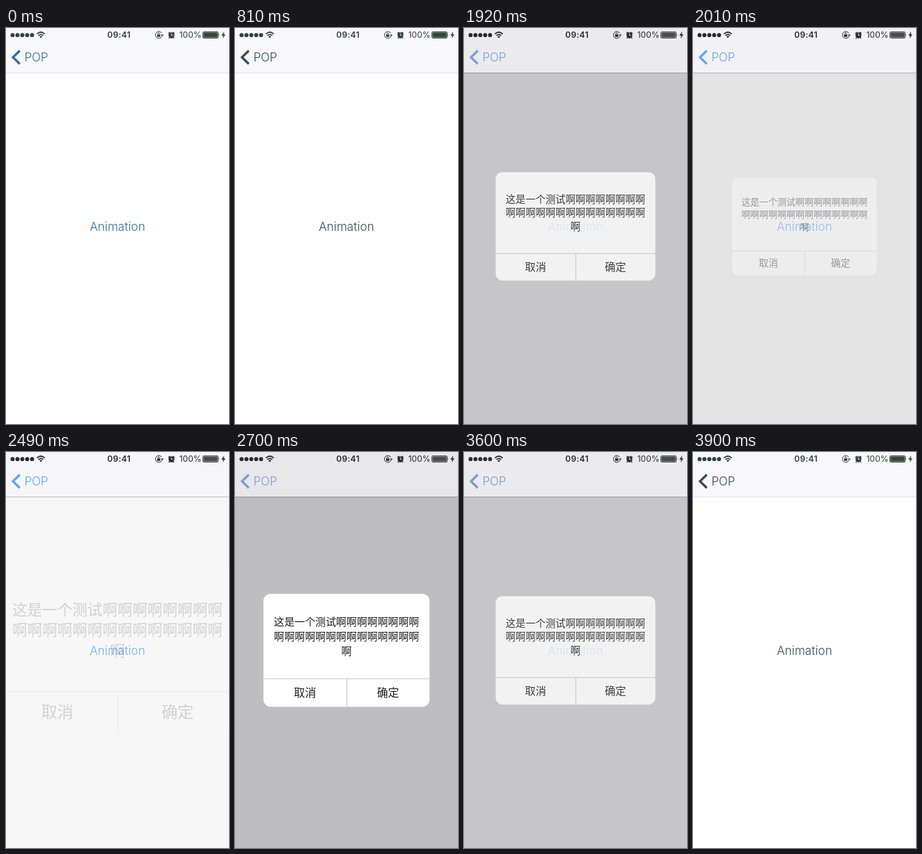
Recreate the animation shown at these times as an HTML page. Size 320x568 px, loop 3.93 s.

```html
<!DOCTYPE html>
<html lang="zh">
<head>
<meta charset="utf-8">
<title>Popup spring</title>
<style>
  html, body { margin: 0; width: 100%; height: 100%; overflow: hidden; background: #fefefe; }
  svg { display: block; width: 320px; height: 568px; }
  text { font-family: Inter, Roboto, sans-serif; }
  .label { font-size: 17px; font-weight: 300; }
  #popup text { font-family: "Noto Sans CJK SC", "Noto Sans CJK", "Noto Sans CJK JP", sans-serif; fill: #1e1c1e; text-anchor: middle; }
</style>
</head>
<body>
<svg viewBox="0 0 320 568">
  <rect width="320" height="568" fill="#fefefe"/>
  <text id="button" class="label" x="160" y="290.5" text-anchor="middle" letter-spacing=".1">Animation</text>
  <rect id="dim" y="65" width="320" height="503" fill="#06000a"/>

  <rect id="nav" width="320" height="64"/>
  <rect id="edge" y="64" width="320" height="1"/>
  <g id="back">
    <path d="M19.8 32.5 L10 42 L19.8 51.5" fill="none" stroke="currentColor" stroke-width="3.2"/>
    <text class="label" x="26.5" y="48" letter-spacing="-.2" fill="currentColor">POP</text>
  </g>

  <g id="status" fill="currentColor" stroke="none">
    <g id="dots"></g>
    <path d="M44.4 8.6 Q50 3.4 55.6 8.6 M46.5 10.9 Q50 7.7 53.5 10.9" fill="none" stroke="currentColor" stroke-width="1.7"/>
    <path d="M50 14.4 L47.9 12.3 Q50 10.6 52.1 12.3 Z"/>
    <text x="162" y="14.4" font-size="12" font-weight="600" text-anchor="middle" letter-spacing=".3">09:41</text>
    <path d="M223.6 7.6 A4.9 4.9 0 1 0 223.9 11.8" fill="none" stroke="currentColor"/>
    <path d="M222 9.5 h4.4 l-2.2 2.6 Z"/>
    <rect x="216.8" y="9.3" width="4.6" height="3.5"/>
    <path d="M217.8 9.5 V8.4 a1.3 1.3 0 0 1 2.6 0 V9.5" fill="none" stroke="currentColor" stroke-width=".9"/>
    <circle cx="237.4" cy="10.5" r="4.2"/>
    <path d="M233 8 L235.4 5.8 M241.8 8 L239.4 5.8 M234.6 13.6 L233.6 15 M240.2 13.6 L241.2 15" stroke="currentColor" stroke-width="1.4"/>
    <path d="M237.4 7.8 V10.6 H239.4" fill="none" stroke="#f4f3f5" stroke-width=".9"/>
    <text x="248.7" y="14.3" font-size="12">100%</text>
    <g id="battery" fill="currentColor">
      <rect x="282.5" y="5.5" width="22" height="9" rx="1.5" fill="none" stroke="currentColor"/>
      <rect x="283.4" y="6.4" width="20.2" height="7.2"/>
      <path d="M305.6 8.3 q1.5 1.7 0 3.4 Z"/>
    </g>
    <path d="M313.2 5 L309 10.8 H311.6 L310.8 15 L315 9.2 H312.4 Z"/>
  </g>

  <g id="popup">
    <rect x="40" y="203" width="240" height="163" rx="10" fill="#fff"/>
    <g id="message" font-size="15"></g>
    <path d="M40 325.5 H280 M160.5 325.5 V366" stroke="#c6c5c7" fill="none"/>
    <g font-size="16">
      <text x="100" y="351.5">取消</text>
      <text x="220" y="351.5">确定</text>
    </g>
  </g>
</svg>
<script>
const LOOP = 3930, FADE_IN = 180, DIM_IN = 260, OUT = 400;
const CYCLES = [{ show: 945, hide: 1786 }, { show: 2462, hide: 3466 }];
const $ = id => document.getElementById(id);
const parts = {};
for (const id of ['button', 'dim', 'nav', 'edge', 'back', 'status', 'battery', 'popup']) parts[id] = $(id);

$('dots').innerHTML = [0, 1, 2, 3, 4]
  .map(i => `<circle cx="${9.4 + i * 7}" cy="10.2" r="2.9"/>`).join('');
$('message').innerHTML = ['这是一个测试' + '啊'.repeat(8), '啊'.repeat(14), '啊']
  .map((line, i) => `<text x="160" y="${249 + i * 20.8}">${line}</text>`).join('');

const clamp = x => Math.min(1, Math.max(0, x));
const inOut = x => x * x / (x * x + (1 - x) * (1 - x));
const mix = (a, b, k) => a.map((v, i) => v + (b[i] - v) * k);
const rgb = c => `rgb(${c.map(Math.round)})`;

// Underdamped spring from 1.5 to 1, t in seconds
const spring = t =>
  1 + 0.5 * Math.exp(-16 * t) * (Math.cos(12 * t) + 16 / 12 * Math.sin(12 * t));

function pose(t) {
  const cycle = CYCLES.find(c => t >= c.show && t < c.hide + OUT);
  if (!cycle) return { scale: 1, alpha: 0, dim: 0 };
  const age = t - cycle.show;
  const out = inOut(clamp((t - cycle.hide) / OUT));
  return {
    scale: spring(age / 1000) - 0.22 * out,
    alpha: clamp(age / FADE_IN) * (1 - out),
    dim: clamp(age / DIM_IN) * (1 - out)
  };
}

function draw(t) {
  const { scale, alpha, dim } = pose(t);
  const light = clamp((t - CYCLES[0].show) / 70) * (1 - inOut(clamp((t - CYCLES[1].hide) / OUT)));
  const dark = mix([52, 110, 150], [44, 78, 92], clamp(t / 510));
  const tint = mix(dark, [90, 168, 248], light);

  parts.button.setAttribute('fill', rgb(tint));
  parts.dim.setAttribute('opacity', 0.28 * dim);
  parts.nav.setAttribute('fill', rgb(mix([248, 247, 249], [231, 230, 233], dim)));
  parts.edge.setAttribute('fill',
    rgb(mix(mix([217, 230, 247], [201, 199, 202], light), [146, 144, 147], dim)));
  parts.back.setAttribute('color', rgb(mix(tint, [126, 158, 204], dim)));
  parts.status.setAttribute('color', rgb(mix([46, 66, 58], [42, 42, 44], light)));
  parts.battery.setAttribute('color', rgb(mix([48, 72, 52], [76, 76, 78], light)));
  parts.popup.setAttribute('opacity', alpha);
  parts.popup.setAttribute('transform',
    `translate(160 284.3) scale(${scale}) translate(-160 -284.3)`);
}

const start = performance.now();
function tick() {
  draw((performance.now() - start) % LOOP);
  requestAnimationFrame(tick);
}
tick();
</script>
</body>
</html>
```
